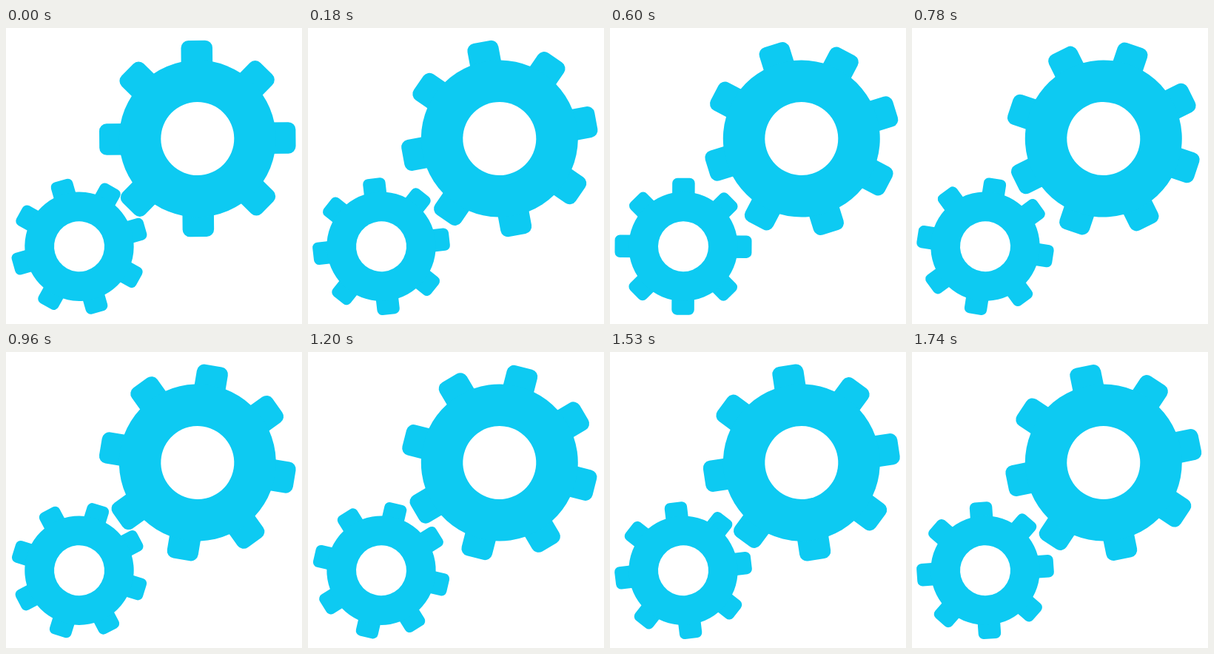
An HTML page that plays this animation: 400x400 px, repeating every 1.77 s.

```html
<!DOCTYPE html>
<html lang="en">
<head>
<meta charset="utf-8">
<title>Gears</title>
<style>
  html, body { margin: 0; width: 100%; height: 100%; overflow: hidden; background: #fff; }
  svg { display: block; width: 100vw; height: 100vh; }
</style>
</head>
<body>
<svg viewBox="0 0 400 400" fill="#0dcaf2"></svg>
<script>
const LOOP = 1770, STEP = 30, TEETH = 8;
const svg = document.querySelector('svg');

// Degrees reached at each listed step; between them the turn is linear.
const keys = [0, 12, 20, 32, 40, 51, 58];
const gears = [
  { x: 258.8, y: 149.5, body: 106, hole: 49.5, tip: 132.7, width: 42.5, round: 10,
    turn: [-0.5, 69.5, 117.7, 189.4, 239.4, 306.4, 348.5] },
  { x: 99, y: 295.2, body: 73.7, hole: 34, tip: 92.5, width: 30.5, round: 7,
    turn: [-15.9, -87, -134.7, -207.8, -257, -321.8, -364] }
];

function add(parent, tag, attrs) {
  const el = document.createElementNS('http://www.w3.org/2000/svg', tag);
  for (const name in attrs) el.setAttribute(name, attrs[name]);
  return parent.appendChild(el);
}

function build(gear) {
  gear.el = add(svg, 'g', {});
  for (let i = 0; i < TEETH; i++) {
    add(gear.el, 'rect', {
      x: -gear.width / 2, y: -gear.tip, width: gear.width, height: gear.tip - gear.hole,
      rx: gear.round, transform: `rotate(${i * 360 / TEETH})`
    });
  }
  add(gear.el, 'circle', { r: gear.body });
  add(gear.el, 'circle', { r: gear.hole, fill: '#fff' });
}

function angleAt(step, turn) {
  let i = 0;
  while (i < keys.length - 2 && step >= keys[i + 1]) i++;
  const part = (step - keys[i]) / (keys[i + 1] - keys[i]);
  return turn[i] + (turn[i + 1] - turn[i]) * part;
}

function draw() {
  const step = Math.floor(performance.now() % LOOP / STEP);
  for (const g of gears) {
    g.el.setAttribute('transform', `translate(${g.x} ${g.y}) rotate(${angleAt(step, g.turn)})`);
  }
  requestAnimationFrame(draw);
}

gears.forEach(build);
draw();
</script>
</body>
</html>
```
